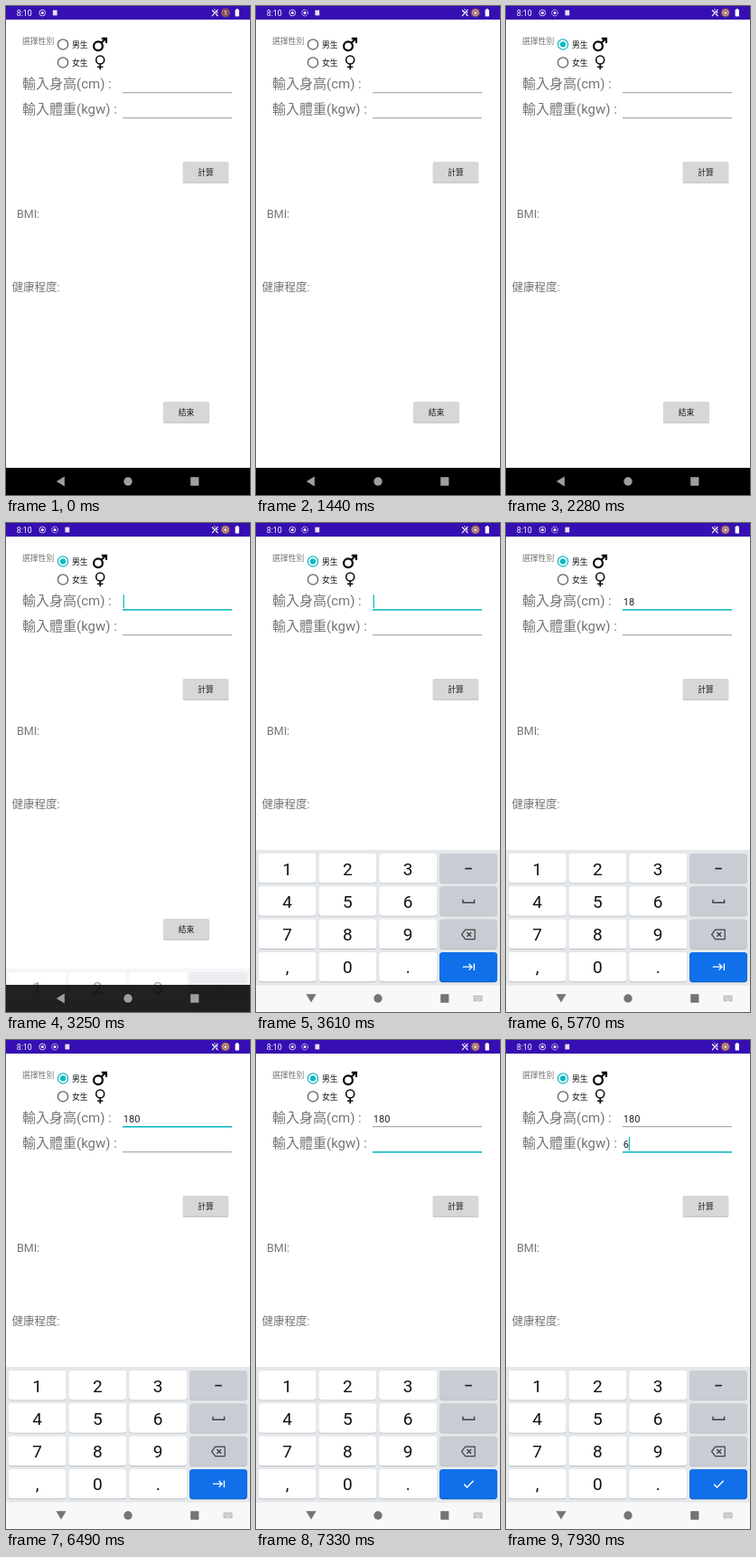
Animation of 270x540 px, one loop 8000 ms. Source, as an HTML page:

```html
<!DOCTYPE html>
<html lang="zh-Hant">
<head>
<meta charset="utf-8">
<style>
html, body { margin: 0; width: 100%; height: 100%; overflow: hidden; background: #fff; }
svg { display: block; width: 270px; height: 540px; }
text { font-family: Roboto, "Noto Sans CJK TC", "Noto Sans CJK", "Noto Sans CJK JP", sans-serif; white-space: pre; }
</style>
</head>
<body>
<svg id="stage" viewBox="0 0 270 540"></svg>
<script>
const stage = document.getElementById('stage');
const LOOP = 8000;
const TEAL = '#12b8c3';

const text = (x, y, size, fill, s, anchor = 'start') =>
  `<text x="${x}" y="${y}" font-size="${size}" fill="${fill}" text-anchor="${anchor}">${s}</text>`;
const rect = (x, y, w, h, fill, r = 0) =>
  `<rect x="${x}" y="${y}" width="${w}" height="${h}" rx="${r}" fill="${fill}"/>`;
const dot = (x, y, r, fill) => `<circle cx="${x}" cy="${y}" r="${r}" fill="${fill}"/>`;
const ring = (x, y, r, stroke, w, extra = '') =>
  `<circle cx="${x}" cy="${y}" r="${r}" fill="none" stroke="${stroke}" stroke-width="${w}" ${extra}/>`;
const line = (d, stroke, w, extra = '') =>
  `<path d="${d}" fill="none" stroke="${stroke}" stroke-width="${w}" ${extra}/>`;
const shape = (d, fill) => `<path d="${d}" fill="${fill}"/>`;

const within = (t, spans) => spans.some(([a, b]) => t >= a && t < b);
// Last row [time, ...values] that has started
const latest = (t, rows) => rows.filter(r => t >= r[0]).pop().slice(1);

const caretOn = [[3250, 3850], [4330, 4570], [4690, 5170], [5290, 5770], [6010, 6490], [6850, 7330], [7810, LOOP]];
const presses = { '1': [4570, 4690], '8': [5170, 5410], '0': [5890, 6130], enter: [6730, 7090], '6': [7690, 7930] };
const heightText = [[0, ''], [4690, '1'], [5290, '18'], [6010, '180']];
const weightText = [[0, ''], [7810, '6']];
const rise = [[0, 150, 0], [3250, 131, .36], [3490, 9, .95], [3610, 0, 1]];
const RADIO_AT = 2160, FOCUS_AT = 3250, NEXT_AT = 6850, RECORD_AT = 120;

function statusBar(t) {
  const rec = t >= RECORD_AT;
  const target = (x, dash) =>
    ring(x, 7.5, 3.4, '#e6e0f5', .9, dash ? 'stroke-dasharray="2 .7"' : '') + dot(x, 7.5, 1.5, '#fff');
  let s = rect(0, 0, 270, 15, '#360fb2') + text(11.8, 10.8, 8.8, '#fff', '8:10') + target(40.3);
  if (rec) s += target(54, true);
  s += rect(rec ? 65.4 : 51.8, 4.6, 4.8, 5.8, '#e6e0f5');
  s += line('M228 4.5l3 3M232 8.5l2.5 2.5M234.5 3.8l-6.5 7.4M230.5 3.5l1 1.2M232.5 6.5l2 1', '#fff', 1.1);
  s += dot(242.8, 7.4, 5, '#8b5058');
  s += rec
    ? ring(242.8, 7.4, 3.1, '#e9c9c4', .9) + dot(242.8, 7.4, 1.5, '#f4dcd8')
    : text(242.8, 10.2, 7.5, '#fff', '1', 'middle');
  return s + rect(253.6, 4, 4.4, 7.4, '#fff', .6) + rect(254.8, 3, 2, 1.2, '#fff');
}

function radio(y, on) {
  const c = on ? TEAL : '#5c5c5c';
  return ring(63, y, 5.6, c, 1.25) + (on ? dot(63, y, 3.1, c) : '');
}

function button(x, y, label) {
  return rect(x - .3, y + .8, 50.6, 23, '#c4c4c4', 1) + rect(x, y, 50, 22.6, '#d6d7d7', 1) +
    text(x + 25, y + 14.6, 8.8, '#1c1c1c', label, 'middle');
}

function field(y, value, focused, caret) {
  let s = focused ? rect(129, y - .6, 121, 1.6, TEAL) : rect(129, y - .3, 121, .9, '#8c8c8c');
  s += text(129.8, y - 4.4, 11, '#222', value);
  if (focused && caret) s += rect(129.6 + value.length * 6.2, y - 16.4, 1.3, 15, TEAL);
  return s;
}

function form(t) {
  const caret = within(t, caretOn);
  const onWeight = t >= NEXT_AT;
  const gray = '#757575';
  return text(18, 41.6, 8.8, gray, '選擇性別') +
    radio(42.4, t >= RADIO_AT) + text(73, 45.6, 8.8, '#111', '男生') +
    radio(62.4, false) + text(73, 65.6, 8.8, '#111', '女生') +
    ring(102, 44.2, 4.9, '#000', 2.2) + line('M105.4 40.8L110.6 35.8M105.8 35.9H111V41', '#000', 2.1) +
    ring(104.2, 59.5, 4.5, '#111', 1.6) + line('M104.2 64V70.2M101 67.2H107.4', '#111', 1.6) +
    text(18, 91, 15, gray, '輸入身高(cm) :') + text(18, 119, 15, gray, '輸入體重(kgw) :') +
    field(95.6, latest(t, heightText)[0], t >= FOCUS_AT && !onWeight, caret) +
    field(123.6, latest(t, weightText)[0], onWeight, caret) +
    button(196, 172, '計算') + button(174.5, 437, '結束') +
    text(12, 234, 12.5, gray, 'BMI:') + text(6.5, 315.2, 12.5, gray, '健康程度:');
}

function keyIcon(name, t) {
  const ink = '#3c4043';
  switch (name) {
    case 'minus': return line('M231.3 381.6h7.6', '#222', 1.6);
    case 'space': return line('M229 415.8v3.4h12.6v-3.4', ink, 1.4);
    case 'del': return line('M231.6 449.2h10.6v10.4h-10.6l-4-5.2z', ink, 1.2, 'stroke-linejoin="round"') +
      line('M233.4 452l4.8 4.8M238.2 452l-4.8 4.8', ink, 1.3);
    case 'enter': return t < NEXT_AT
      ? line('M228.8 490.2h10M235.6 486.8l3.4 3.4l-3.4 3.4M241.4 486.4v7.6', '#fff', 1.3)
      : line('M230.2 490.6l3.3 3.3l7.2 -7.2', '#fff', 1.4);
  }
  return '';
}

function keyboard(t) {
  const rows = [['1', '2', '3', 'minus'], ['4', '5', '6', 'space'], ['7', '8', '9', 'del'], [',', '0', '.', 'enter']];
  let s = rect(0, 361, 270, 180, '#e5e8eb');
  rows.forEach((row, r) => row.forEach((name, c) => {
    const x = 2.6 + c * 66.8, y = 365 + r * 36.3;
    const held = presses[name] && within(t, [presses[name]]);
    const fill = name === 'enter' ? (held ? '#0d5fd0' : '#0f70ea')
      : c === 3 ? '#c9ccd3' : held ? '#e3e3e3' : '#fff';
    s += rect(x, y + .9, 64, 32.4, name === 'enter' ? '#0c56b8' : '#b9bdc2', 3.6) + rect(x, y, 64, 32.4, fill, 3.6);
    s += c < 3 ? text(x + 32, y + 23.5, 19, '#111', name, 'middle') : keyIcon(name, t);
  }));
  return s;
}

function navBar(t, open) {
  const rising = t >= FOCUS_AT && !open;
  const ink = open ? '#747474' : '#a29e9b';
  let s = open ? rect(0, 510.6, 270, 30, '#f8f8f8')
    : `<rect y="510" width="270" height="30" fill="#000" opacity="${rising ? .87 : 1}"/>`;
  s += shape(open ? 'M55.4 520.2H66.6L61 529.4Z' : 'M55.8 525L64.8 519.6V530.4Z', ink);
  s += dot(135, 525, 4.7, ink) + rect(204.2, 520.3, 9.2, 9.4, ink, .5);
  if (open) {
    s += rect(240.6, 521.8, 10, 6.4, '#bdbdbd', .8);
    s += line('M241.8 523.6h7.8M241.8 525.2h7.8', '#f8f8f8', .8, 'stroke-dasharray="1 .7"');
    s += line('M243.4 526.9h4.4', '#f8f8f8', .7);
  }
  return s;
}

function render(t) {
  const [shift, alpha] = latest(t, rise);
  const keys = alpha ? `<g transform="translate(0 ${shift})" opacity="${alpha}">${keyboard(t)}</g>` : '';
  stage.innerHTML = rect(0, 0, 270, 540, '#fff') + form(t) + keys + navBar(t, t >= 3490) + statusBar(t);
}

let start;
function tick(now) {
  start ??= now;
  render((now - start) % LOOP);
  requestAnimationFrame(tick);
}
render(0);
requestAnimationFrame(tick);
</script>
</body>
</html>
```
